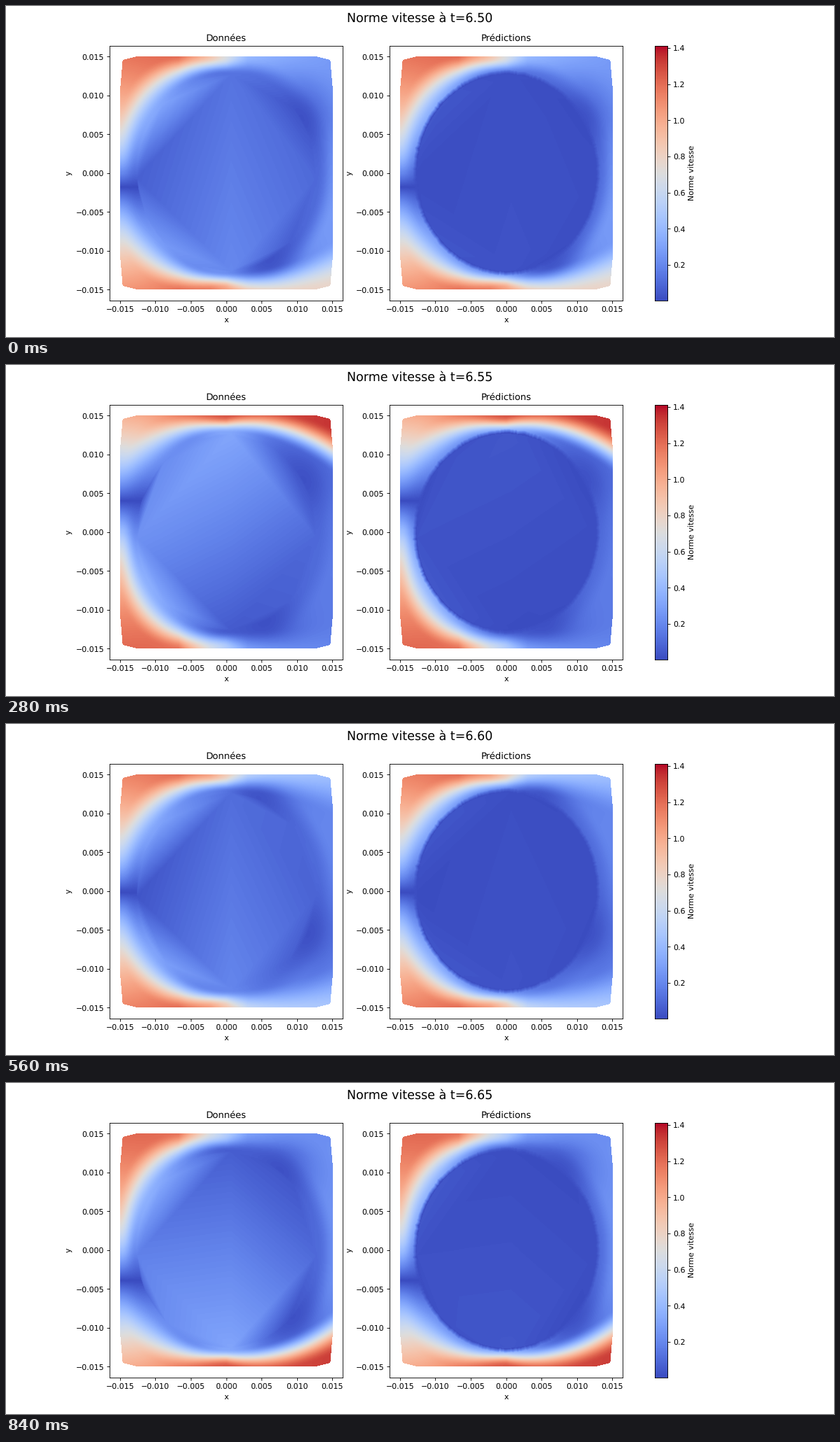
Recreate the animation shown at these times as a matplotlib script. Size 1183 px wide and 473 px high, loop 0.98 s.

```python
import numpy as np
import matplotlib.pyplot as plt
from matplotlib.animation import FuncAnimation
from matplotlib.tri import LinearTriInterpolator, Triangulation

W, H, DPI = 1183, 473, 64
K = 78.87 / DPI          # keeps text and lines at their size for this dpi
VMAX, BANDS = 1.4136, 200
XLIM, YLIM = 0.01647, 0.01641
R_MESH, R_DISK = 0.84, 0.85
STEPS, SHED = 7, np.radians(52)   # shedding phase advance per step

plt.rcParams.update({
    "font.family": "DejaVu Sans", "font.size": 10 * K, "text.hinting": "none",
    "axes.linewidth": 0.8 * K, "axes.labelpad": 4 * K, "axes.titlepad": 6 * K,
    "xtick.major.size": 3.5 * K, "ytick.major.size": 3.5 * K,
    "xtick.major.width": 0.8 * K, "ytick.major.width": 0.8 * K,
    "xtick.major.pad": 3.5 * K, "ytick.major.pad": 3.5 * K,
})


def smoothstep(t):
    t = np.clip(t, 0, 1)
    return t * t * (3 - 2 * t)


def bell(t):
    return np.exp(-t * t)


def front(u):
    """1 upstream of the cylinder, 0 from its middle on."""
    return smoothstep(-u / 0.85)


def off_axis(v, p):
    """Height above the swinging stagnation point."""
    return np.abs(v - 0.27 * np.sin(p))


def calm(u, v, p):
    """Slow flow along the wall and in the wake."""
    deg = np.degrees(np.arctan2(v, u))
    d = np.clip(np.hypot(u, v) - R_DISK, 0, None)
    wake = 0.1 + (0.1 - 0.09 * np.sin(2 * p)) * smoothstep(d / 0.2)
    for side, q in ((1, p), (-1, p + np.pi)):
        near = bell(d / 0.3)
        vortex = 48 - 25 * np.cos(q - 0.5)
        wake = wake + (0.09 + 0.13 * np.sin(q)) * near * bell((side * deg - 90) / 22)
        wake = wake * (1 - 0.8 * near * bell((side * deg - vortex) / 20))
    f = front(u)
    return f * 0.4 * np.tanh(2.2 * off_axis(v, p)) + (1 - f) * wake


def stream(u, v, p, s):
    """Fast flow outside the shear layers; s swings with the shedding."""
    keys = [-1, -0.45, -0.15, 0.2, 1]
    mean = np.interp(u, keys, [1.12, 1.2, 1.02, 0.6, 0.45])
    swing = np.interp(u, keys, [0, 0.05, 0.3, 0.5, 0.58])
    bend = np.interp(u, keys, [0, -0.02, -0.08, 0.2, 0.34])
    stall = np.tanh(1.3 * off_axis(v, p)) / 0.86
    return (mean + swing * s + bend * s * s) * (1 + front(u) * (stall - 1))


def flow(u, v, p):
    # The lower half repeats the upper one, mirrored, half a period later
    s = np.sign(v) * np.sin(p)
    rho, w = np.hypot(u, v), np.abs(v)
    sin2 = 2 * u * v / rho ** 2
    height = np.where(u < 0, rho, w + (0.22 + 0.13 * s) * u * u) - R_DISK
    depth = 0.14 + np.where(u < 0, 0.2 * sin2 ** 2, 0.25 * u)
    slow = calm(u, v, p)
    return slow + (stream(u, v, p, s) - slow) * smoothstep(height / depth)


# Pixel grid in units of 0.015
NX, NY = 334, 364
xs = (np.arange(NX) + 0.5) / NX * 2 - 1
ys = (np.arange(NY) + 0.5) / NY * 2 - 1
U, V = np.meshgrid(xs * XLIM / 0.015, ys * YLIM / 0.015)
RHO = np.hypot(U, V)
AU, AV = np.abs(U), np.abs(V)
OUTSIDE = ((AU > 1.001) | (AV > 0.998) | (AU + 0.094 * AV > 1.066)
           | (AV + 0.226 * AU > 1.188))

# The hole of the mesh: a diamond whose sides are split again and again
SIDE = 16
tips = [183, 87, -3, -87, -177]
rim = np.radians(np.concatenate([np.linspace(a, b, SIDE, endpoint=False)
                                 for a, b in zip(tips, tips[1:])]))
RIM_U, RIM_V = R_MESH * np.cos(rim), R_MESH * np.sin(rim)


def fan(i, j):
    if j - i < 2:
        return []
    m = (i + j) // 2
    return [(i, m, j % len(rim))] + fan(i, m) + fan(m, j)


cells = [(0, SIDE, 3 * SIDE), (SIDE, 2 * SIDE, 3 * SIDE)]
for k in range(4):
    cells += fan(k * SIDE, (k + 1) * SIDE)
MESH = Triangulation(RIM_U, RIM_V, cells)

# Slightly ragged edge of the predicted disk
rng = np.random.default_rng(4)
ragged = np.interp(np.degrees(np.arctan2(V, U)), np.arange(360),
                   rng.normal(0, 0.003, 360), period=360)
DISK = np.clip((RHO + ragged - R_DISK + 0.005) / 0.035, 0, 1)


def fields(i):
    p = SHED * (i - 0.5)
    hole = LinearTriInterpolator(MESH, calm(RIM_U, RIM_V, p))(U, V).filled(np.nan)
    speed = flow(U, V, p)
    data = np.where(np.isnan(hole), speed, hole)
    still = 0.12 * np.nan_to_num(hole, nan=0.1)
    pred = still + (speed - still) * DISK
    return [np.ma.array(z, mask=OUTSIDE) for z in (data, pred)]


fig = plt.figure(figsize=(W / DPI, H / DPI), dpi=DPI, facecolor="white")
head = fig.suptitle("", fontsize=16 * K)
cmap = plt.get_cmap("coolwarm", BANDS)


def heat(ax, z, extent):
    return ax.imshow(z, origin="lower", aspect="auto", extent=extent, cmap=cmap,
                     interpolation="nearest", vmin=0, vmax=VMAX)


images = []
width = 0.62 / 2.2
ticks = np.arange(-3, 4) * 0.005
for left, name in ((0.125, "Données"), (0.125 + 1.2 * width, "Prédictions")):
    ax = fig.add_axes([left, 0.11, width, 0.77])
    images.append(heat(ax, np.zeros((NY, NX)), (-XLIM, XLIM, -YLIM, YLIM)))
    ax.set(title=name, xlabel="x", ylabel="y", xticks=ticks, yticks=ticks,
           xlim=(-XLIM, XLIM), ylim=(-YLIM, YLIM))

cax = fig.add_axes([0.78375, 0.11, 0.77 / 20 * H / W, 0.77])
heat(cax, (np.arange(BANDS)[:, None] + 0.5) / BANDS * VMAX, (0, 1, 0, VMAX))
cax.yaxis.tick_right()
cax.yaxis.set_label_position("right")
cax.set(xticks=[], yticks=np.arange(1, 8) * 0.2, ylim=(0.002, VMAX),
        ylabel="Norme vitesse")


def draw(i):
    hundredths = 650 + (5 * i + 1) // 2
    head.set_text(f"Norme vitesse à t={hundredths / 100:.2f}")
    for image, z in zip(images, fields(i)):
        image.set_data(z)
    return [head, *images]


anim = FuncAnimation(fig, draw, frames=STEPS, interval=140, repeat=True,
                     repeat_delay=0, blit=False)
plt.show()
```
